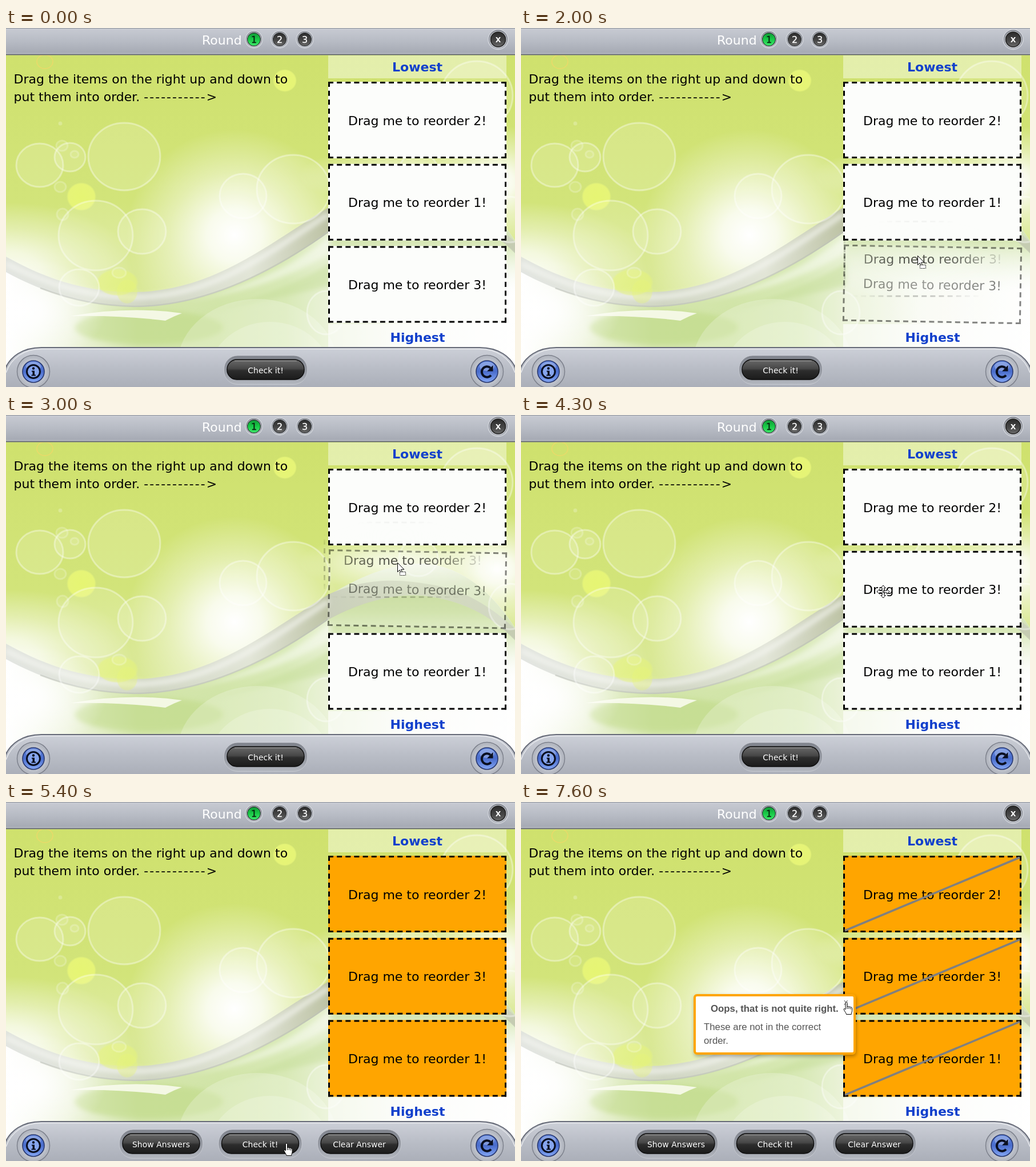
An HTML page that plays this animation: 891x628 px, repeating every 8 s.

```html
<!DOCTYPE html>
<html lang="en">
<head>
<meta charset="utf-8">
<title>Put the items in order</title>
<style>
  html, body { margin: 0; width: 100%; height: 100%; overflow: hidden; background: #d0e272; }
  svg { display: block; width: 100%; height: 100%; }
  text { font-family: "DejaVu Sans", Verdana, sans-serif; font-size: 22px; }
  .mid { text-anchor: middle; }
  .label { font-weight: bold; fill: #1240cc; }
  .btn { font-size: 14px; fill: #fff; }
  .num { font-size: 16px; stroke-width: .3; }
  .tip text { font-family: "Liberation Sans", Arial, sans-serif; font-size: 16.8px; fill: #555; }
  .ring { fill: #fff; fill-opacity: .14; stroke: #fff; stroke-opacity: .36; stroke-width: 3; }
  .dash { fill: none; stroke: #000; stroke-width: 3; }
</style>
</head>
<body>
<svg id="stage" viewBox="0 0 891 628" preserveAspectRatio="none"></svg>
<script>
const stage = document.getElementById('stage');
const $ = id => document.getElementById(id);

// ---- paint helpers ----
const stops = list => list.map(([o, c, a = 1]) =>
  `<stop offset="${o}" stop-color="${c}" stop-opacity="${a}"/>`).join('');
const lin = (id, list, horiz) =>
  `<linearGradient id="${id}" x1="0" y1="0" x2="${horiz ? 1 : 0}" y2="${horiz ? 0 : 1}">${stops(list)}</linearGradient>`;
const rad = (id, list) => `<radialGradient id="${id}">${stops(list)}</radialGradient>`;
const oval = (x, y, rx, ry, attrs) => `<ellipse cx="${x}" cy="${y}" rx="${rx}" ry="${ry}" ${attrs}/>`;
const disc = (x, y, r, attrs) => `<circle cx="${x}" cy="${y}" r="${r}" ${attrs}/>`;
const box = (x, y, w, h, r, attrs) =>
  `<rect x="${x}" y="${y}" width="${w}" height="${h}" rx="${r}" ${attrs}/>`;
const path = (d, attrs) => `<path d="${d}" ${attrs}/>`;
const text = (x, y, s, attrs = '') => `<text x="${x}" y="${y}" ${attrs}>${s}</text>`;

const defs = `<defs>
  ${lin('sky', [[0, '#cfe16d'], [.45, '#d2e47a'], [.75, '#dbe99c'], [1, '#e8f1c6']])}
  ${lin('field', [[0, '#fff'], [.12, '#f0f5e0'], [.26, '#d3e5ab'], [.42, '#d2e5a9'], [.55, '#d8e9b6'], [.64, '#e8f1d4'], [.78, '#f8faf2'], [1, '#fff']], 1)}
  ${lin('band', [[0, '#dde0db'], [.16, '#dde0da'], [.28, '#cdd1c9'], [.48, '#dfe2d6'], [.63, '#b9bda9'], [.8, '#c3cda9'], [1, '#c4c9b4']], 1)}
  ${lin('dome', [[0, '#f1f5e4'], [.25, '#dce8c4'], [1, '#c9dba4']])}
  ${lin('valley', [[0, '#bdd58b'], [.2, '#c6dc98'], [.45, '#d8e8b8', .9], [1, '#fff', 0]])}
  ${lin('bar', [[0, '#c8cbd3'], [.5, '#b7bbc4'], [1, '#a3a7b1']])}
  ${lin('foot', [[0, '#cdd0d8'], [.5, '#b9bdc6'], [1, '#a9adb7']])}
  ${lin('well', [[0, '#7f838c'], [.6, '#989ca5'], [1, '#b4b8c0']])}
  ${lin('pill', [[0, '#6a6a6a'], [.45, '#474747'], [.55, '#2d2d2d'], [1, '#1b1b1b']])}
  ${lin('press', [[0, '#3a3a3a'], [.5, '#222'], [1, '#3d3d3d']])}
  ${lin('blue', [[0, '#5f84dc'], [.5, '#4a6dcc'], [1, '#83a6f4']])}
  ${lin('green', [[0, '#0f9a35'], [.5, '#19c947'], [1, '#3fe86b']])}
  ${lin('dark', [[0, '#2b2b2b'], [.6, '#484848'], [1, '#6b6b6b']])}
  ${rad('glow', [[0, '#fff'], [.25, '#fff', .85], [.6, '#fff', .4], [1, '#fff', 0]])}
  ${rad('sun', [[0, '#e6f573'], [.88, '#e7f577', .95], [1, '#e8f67c', 0]])}
  <filter id="soft" x="-20%" y="-50%" width="140%" height="200%"><feGaussianBlur stdDeviation="4"/></filter>
  <filter id="shade" x="-10%" y="-10%" width="120%" height="130%">
    <feDropShadow dx="1" dy="3" stdDeviation="3" flood-opacity=".3"/></filter>
  <radialGradient id="fade" gradientUnits="userSpaceOnUse" cx="0" cy="0" r="1"
    gradientTransform="translate(129 74) scale(175 78)">
    ${stops([[0, '#fff', .7], [.45, '#fff', .55], [.75, '#fff', .22], [.9, '#fff', .05], [1, '#fff', 0]])}
  </radialGradient>
  <mask id="veil" maskUnits="userSpaceOnUse" x="0" y="0" width="312" height="134" style="mask-type:alpha">
    <rect width="312" height="134" fill="url(#fade)"/></mask>
</defs>`;

// ---- backdrop ----
const rings = [[59, 240, 41, 38], [112, 226, 27, 25], [207, 225, 63, 59], [157, 363, 65, 61],
  [238, 356, 42, 39], [415, 294, 41, 39], [503, 282, 64, 60], [128, 454, 35, 32], [824, 118, 63, 60],
  [560, 498, 33, 38], [722, 250, 34, 32], [882, 335, 37, 40]];
const beads = [[95, 278, 10, 9], [99, 326, 10, 10], [120, 221, 7, 6], [98, 206, 10, 9],
  [198, 428, 12, 9], [95, 167, 2, 2]];

const crest = 'C630 276 680 260 730 260C800 265 850 310 891 372';
const swoosh = 'M0 400C80 445 150 462 225 462C360 460 450 385 564 314C640 280 700 290 740 296' +
  'C800 304 850 336 891 374V394C850 352 800 324 730 316C690 312 630 322 564 358' +
  'C470 425 350 488 225 488C140 485 70 465 0 427Z';

const backdrop = box(0, 40, 891, 588, 0, 'fill="url(#sky)"') +
  oval(400, 362, 190, 185, 'fill="url(#glow)"') +
  oval(690, 258, 180, 50, 'fill="url(#glow)" opacity=".7"') +
  oval(860, 270, 120, 100, 'fill="url(#glow)"') +
  oval(0, 420, 230, 115, 'fill="url(#glow)" opacity=".85"') +
  path('M0 422C70 462 140 484 225 486C350 486 470 423 564 354' + crest + 'V628H0Z', 'fill="url(#field)"') +
  path('M564 354C630 320 690 310 730 314C800 322 850 350 891 392V470H564Z', 'fill="url(#valley)"') +
  path('M564 316' + crest + 'V392C850 352 800 324 730 316C690 312 630 322 564 356Z', 'fill="url(#dome)"') +
  oval(250, 524, 130, 30, 'fill="#bcd880" opacity=".5" filter="url(#soft)"') +
  path('M300 482Q470 445 570 362V392Q480 450 330 476Z', 'fill="#fff" opacity=".45" filter="url(#soft)"') +
  path('M330 500Q470 470 570 410V450Q450 480 330 500Z', 'fill="#c5dd98" opacity=".5" filter="url(#soft)"') +
  oval(440, 590, 140, 116, 'fill="#fff" opacity=".22"') +
  oval(462, 620, 112, 106, 'fill="#fff" opacity=".2"') +
  path('M112 504Q215 486 308 499Q294 504 279 512Q200 502 112 504Z', 'fill="#fcfdf2" opacity=".85"') +
  oval(25, 495, 150, 95, 'fill="url(#glow)"') +
  path(swoosh, 'fill="url(#band)" opacity=".85"') +
  path('M0 412C80 452 150 470 225 471C360 470 450 400 564 326', 'fill="none" stroke="#f6f7f3" stroke-width="9" opacity=".7" filter="url(#soft)"') +
  path('M60 455C120 478 170 486 225 487C350 487 470 424 564 357', 'fill="none" stroke="#b9bdb4" stroke-width="2.5" opacity=".5"') +
  oval(132, 295, 26, 25, 'fill="url(#sun)"') +
  oval(488, 92, 21, 20, 'fill="url(#sun)"') +
  oval(195, 445, 37, 24, 'fill="url(#sun)" opacity=".55"') +
  oval(212, 461, 19, 22, 'fill="url(#sun)" opacity=".4"') +
  rings.map(r => oval(...r, 'class="ring"')).join('') +
  beads.map(b => oval(...b, 'class="ring" opacity=".6"')).join('') +
  oval(68, 59, 14, 12, 'fill="none" stroke="#ecd96a" stroke-width="1.5"');

// ---- bars and buttons ----
const knob = (x, n, fill, ink) => disc(x, 20, 15, 'fill="url(#well)" stroke="#d3d6dc" stroke-width="1.4"') +
  disc(x, 20, 12.6, 'fill="#dfe1e5"') +
  disc(x, 20, 11.4, `fill="url(#${fill})" stroke="#2c2f33" stroke-width="1.2"`) +
  text(x, 26, n, `class="num mid" fill="${ink}" stroke="${ink}"`);

const button = (cx, label, id) =>
  box(cx - 73, 573, 146, 50.5, 24, 'fill="url(#well)" stroke="#d5d8de" stroke-opacity=".6"') +
  box(cx - 67.5, 580, 135, 35, 17, `${id ? `id="${id}"` : ''} fill="url(#pill)" stroke="#0c0c0c" stroke-width="1.4"`) +
  path(`M${cx - 54} 582.5H${cx + 54}`, 'stroke="#aaa" stroke-opacity=".7" stroke-linecap="round"') +
  text(cx, 604, label, 'class="btn mid"');

const orb = x => disc(x, 601, 28.5, 'fill="#b4b8c1" stroke="#7d818c" stroke-width="1.5"') +
  disc(x, 601, 24, 'fill="#bcc0c9"') +
  disc(x, 601, 19, 'fill="url(#blue)" stroke="#27376f" stroke-width="1.6"') +
  oval(x, 592, 13, 8, 'fill="#fff" opacity=".28"');

const bars = box(0, 0, 891, 47, 0, 'fill="url(#bar)"') +
  path('M0 .5H891', 'stroke="#8f939c"') + path('M0 44.5H891', 'stroke="#c3c6cd"') +
  path('M0 46.5H891', 'stroke="#6c707a" stroke-width="2"') +
  text(343, 29, 'Round', 'fill="#fff"') +
  knob(434, 1, 'green', '#06240e') + knob(479, 2, 'dark', '#fff') + knob(523, 3, 'dark', '#fff') +
  disc(861.5, 20, 17.5, 'fill="url(#well)" stroke="#d3d6dc" stroke-width="1.4"') +
  disc(861.5, 20, 14.5, 'fill="#dfe1e5"') +
  disc(861.5, 20, 13, 'fill="url(#dark)" stroke="#1d1d1d" stroke-width="1.5"') +
  text(861.5, 24.5, 'X', 'class="mid" style="font-size:12.5px;font-weight:bold;fill:#fff"') +
  path('M-3 632V600C6 574 30 559 62 559H829C861 559 885 574 894 600V632Z', 'fill="url(#foot)" stroke="#676b78" stroke-width="2"') +
  path('M0 603C9 577 32 561.5 62 561.5H829C859 561.5 882 577 891 603', 'fill="none" stroke="#e6e8ec" stroke-width="1.5"') +
  orb(48) + disc(48, 601, 11.5, 'fill="#86a5ee" stroke="#0a0f20" stroke-width="3"') +
  disc(48, 595.5, 2.2, 'fill="#0a0f20"') + path('M45 599.5H50V606.5H52V608.5H44.5V606.5H46.5V601.5H45Z', 'fill="#0a0f20"') +
  orb(842) + path('M849 607.5A9.2 9.2 0 1 1 848 594.5', 'fill="none" stroke="#0a0f20" stroke-width="4"') +
  path('M852.5 590V600.5H842Z', 'fill="#0a0f20"');

// ---- sortable cards ----
const W = 312, H = 134;
const slotY = n => 94 + 143.7 * n;
const dashes = (len, n) => `class="dash" stroke-dasharray="9 ${((len - 9) / n - 9).toFixed(3)}"`;
const card = n => box(0, 0, W, H, 0, 'class="face" fill="#fcfdfb"') +
  path(`M0 1.5H${W}`, dashes(W, 20)) + path(`M0 ${H - 1.5}H${W}`, dashes(W, 20)) +
  path(`M1.5 0V${H}`, dashes(H, 8)) + path(`M${W - 1.5} 0V${H}`, dashes(H, 8)) +
  text(156, 75.5, `Drag me to reorder ${n}!`, 'class="mid"');

const cards = [1, 2, 3].map(n => `<g id="card${n}">${card(n)}</g>`).join('');
const strikes = [0, 1, 2].map(n =>
  path(`M567 ${slotY(n) + 131}L873 ${slotY(n) + 3}`, 'stroke="#808080" stroke-width="3.6"')).join('');

const labels = text(13.5, 97, 'Drag the items on the right up and down to') +
  text(13.5, 128, 'put them into order. <tspan letter-spacing="2">-----------</tspan>&gt;') +
  box(564, 48, W, 40, 0, 'fill="#fff" opacity=".42"') + box(564, 518, W, 41, 0, 'fill="#fff" opacity=".6"') +
  text(720, 76, 'Lowest', 'class="label mid"') + text(720.5, 549, 'Highest', 'class="label mid"');

const tip = box(304, 338, 280, 102, 4, 'fill="#fff" stroke="#ffa500" stroke-width="4" filter="url(#shade)"') +
  text(332, 367, 'Oops, that is not quite right.', 'font-weight="bold"') +
  text(320, 399, 'These are not in the correct') + text(320, 423, 'order.') +
  text(565, 354.5, 'x', 'style="font-size:15px;fill:#777"');

// ---- pointers, hot spot at 0,0 ----
const outline = 'fill="#fff" stroke="#000" stroke-width="1" stroke-linejoin="round"';
const arrow = path('M.5 .5V16.5L4.2 13L7 19.5L9.3 18.5L6.6 12.2H11.8Z', outline);
const quarter = [0, 90, 180, 270].map(a =>
  path('M-1.8 -2V-6.5H-4.2L0 -11L4.2 -6.5H1.8V-2', `${outline} transform="rotate(${a})"`)).join('');
const pointers = {
  arrow,
  grab: arrow + box(4.5, 16.5, 10, 6, 0, 'fill="#fff" stroke="#000" stroke-dasharray="1.5 1"'),
  move: quarter + disc(0, 0, 1.4, 'fill="#fff" stroke="#444"'),
  hand: path('M-1.5 1.5a1.5 1.5 0 0 1 3 0V8c1-1 3-.6 3 .6c1-1 3-.6 3 .8c1-.8 2.6-.2 2.6 1.2V14.5c0 3-1.4 4-1.4 7H0' +
    'c0-2-3.6-6-4.3-8.5c-.5-1.4 1-2.2 2-.9L-1.5 13Z', outline) + path('M1.5 8V12M4.5 9V12M7.5 10V12.5', 'stroke="#000"')
};

stage.innerHTML = defs + backdrop + labels + bars +
  `<g id="plain">${button(454.5, 'Check it!', 'check')}</g>` +
  `<g id="full">${button(271.5, 'Show Answers')}${button(445, 'Check it!')}${button(618.5, 'Clear Answer')}</g>` +
  cards + `<g id="strikes">${strikes}</g>` +
  `<g id="ghost"><g mask="url(#veil)">${card(3)}</g></g><g id="tip" class="tip">${tip}</g>` +
  Object.keys(pointers).map(k => `<g id="${k}">${pointers[k]}</g>`).join('');
document.querySelector('#ghost .face').setAttribute('fill-opacity', .3);

// ---- motion ----
// time, x, y of the pointer
const track = [[800, 712, 602], [1000, 710, 555], [1200, 702, 485], [1400, 693, 451], [1800, 693, 446],
  [2000, 694, 398], [2200, 694, 335], [2300, 694, 306], [2500, 690, 245], [2600, 687, 228], [2700, 686, 232],
  [2900, 685, 253], [3000, 685, 258], [4200, 685, 258], [4300, 634, 309], [4500, 550, 430],
  [4700, 506, 550], [4900, 491, 597], [6300, 491, 597], [6500, 503, 568], [6800, 546, 482],
  [7000, 572, 415], [7200, 572, 363], [7300, 570, 355], [7400, 570, 355], [7500, 570, 352], [7600, 569.5, 350]];

function at(t) {
  const i = track.findIndex(k => k[0] > t);
  if (i < 0) return track[track.length - 1].slice(1);
  if (!i) return track[0].slice(1);
  const [t0, x0, y0] = track[i - 1], [t1, x1, y1] = track[i], k = (t - t0) / (t1 - t0);
  return [x0 + (x1 - x0) * k, y0 + (y1 - y0) * k];
}

// time from which each pointer is used
const looks = [[0, ''], [800, 'arrow'], [1200, 'move'], [1800, 'grab'], [3300, 'move'], [4400, 'arrow'],
  [4800, 'hand'], [6500, 'arrow'], [7300, 'hand']];

const show = (id, on) => $(id).setAttribute('visibility', on ? 'visible' : 'hidden');
const place = (id, x, y, extra = '') => $(id).setAttribute('transform', `translate(${x} ${y}) ${extra}`);
const SPAN = 8000, STEP = 100;

function draw(now) {
  const t = Math.floor(now % SPAN / STEP) * STEP;
  const drag = t >= 1800 && t < 3300, swapped = t >= 2100, done = t >= 5400;
  const [x, y] = at(t);

  place('card2', 564, slotY(0));
  place('card1', 564, slotY(swapped ? 2 : 1));
  place('card3', 564, slotY(swapped ? 1 : 2), drag ? `rotate(1 ${W / 2} ${H / 2})` : '');
  $('card3').setAttribute('opacity', drag ? .48 : 1);
  $('card3').firstChild.setAttribute('fill-opacity', drag ? .45 : 1);
  for (const n of [1, 2, 3]) $('card' + n).firstChild.setAttribute('fill', done ? '#ffa500' : '#fcfdfb');

  const [gx, gy] = at(t - 36);
  place('ghost', gx - 129, gy - 70);
  show('ghost', drag);

  show('plain', !done);
  show('full', done);
  $('check').setAttribute('fill', t >= 5200 ? 'url(#press)' : 'url(#pill)');

  const fade = Math.min(1, Math.max(0, (t - 5400) / 300));
  $('tip').setAttribute('opacity', fade);
  $('strikes').setAttribute('opacity', fade);

  const look = looks.filter(l => l[0] <= t).pop()[1];
  for (const k in pointers) show(k, k === look);
  if (look) place(look, x, y);
}

const start = performance.now();
function tick(now) {
  draw(Math.max(0, now - start));
  requestAnimationFrame(tick);
}
draw(0);
requestAnimationFrame(tick);
</script>
</body>
</html>
```
